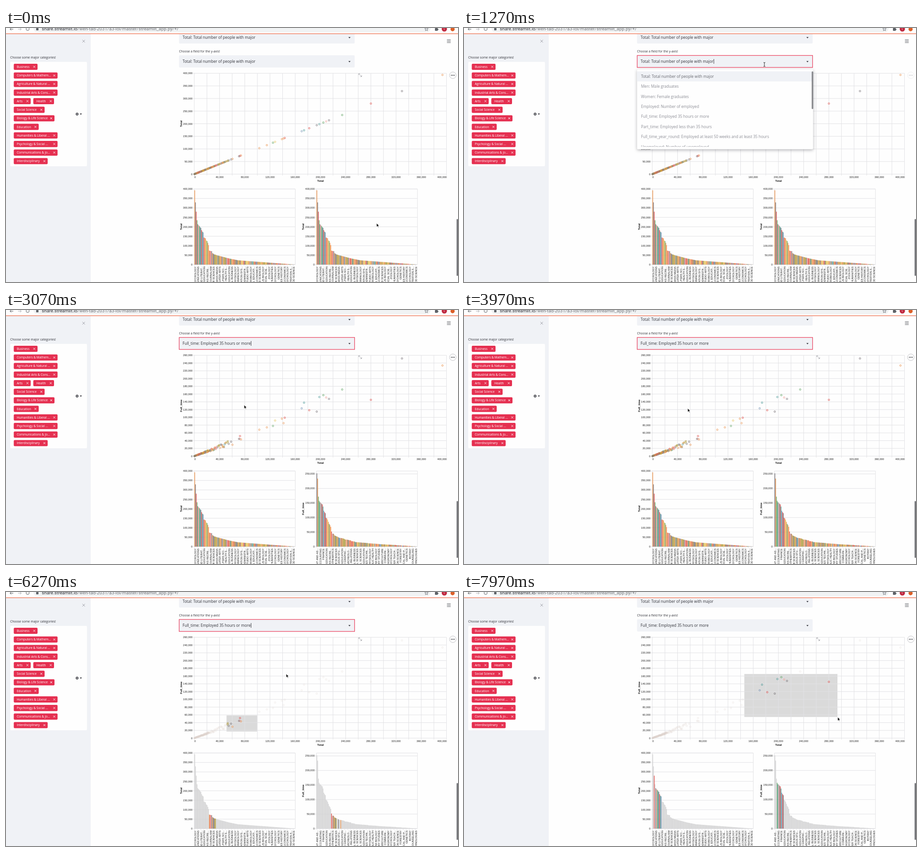
Recreate the animation shown at these times as an HTML page with a canvas. Size 960 by 540 pixels, loop 8000 ms.

```html
<!DOCTYPE html>
<html lang="en">
<head>
<meta charset="utf-8">
<title>Majors explorer</title>
<style>
html, body { margin: 0; width: 100%; height: 100%; overflow: hidden; background: #fefefe; }
canvas { display: block; width: 960px; height: 540px; }
</style>
</head>
<body>
<canvas id="stage" width="960" height="540"></canvas>
<script>
const ctx = document.getElementById('stage').getContext('2d');
const LOOP = 8000;
const UI = '"Open Sans", "Noto Sans", sans-serif';
const AXIS = '"Liberation Sans", Arial, sans-serif';
const PAGE = '#fefefe', TINT = '#f0f2f6', GRID = '#e2e2e5', INK = '#303138', SOFT = '#5f6368';
const RED = '#e52f50', FADED = '#d2d2d3';

// Moments of the interaction
const OPEN = 1200, CLOSE = 2400, UPDATE = 2750, DRAG1 = 4600, DROP1 = 5300, DRAG2 = 6350;

const clamp = (v, a = 0, b = 1) => Math.min(b, Math.max(a, v));
const smooth = u => u * u * (3 - 2 * u);
const mix = (a, b, u) => a + (b - a) * u;

// ---------- data ----------
let seed = 17;
function rand() {
  seed = (seed * 16807) % 2147483647;
  return seed / 2147483647;
}

const PLOT = { x: 400, y: 96.3, w: 535.6, h: 214.4 };
const BASE = PLOT.y + PLOT.h;
const COUNT = 131, BAR_WIDTH = 214.4, PITCH = BAR_WIDTH / COUNT;

const COLORS = {
  O: '#ea9450', R: '#e05450', B: '#7896b8', G: '#62a566', L: '#b09a3c',
  W: '#a0745a', Y: '#79757a', T: '#4d9a98', P: '#f0a09a', E: '#e6c45c'
};
const TOP_COLORS = 'OYRGYPGTYRTBROOEGOO';
const TAIL_COLORS = 'OOORRWWLLBGYYPTE';

// Stage positions of the largest majors in the second scatter plot
const LARGE = [
  [927, 118], [841, 103], [775, 191], [714, 169], [686, 189], [680, 186], [674, 181],
  [665.5, 185], [660, 216], [644, 213], [633, 197], [628, 209], [592, 229], [589.5, 240.5],
  [586, 231], [571.5, 235], [567, 246.5], [554, 249.5], [538, 254.5], [499, 275], [497, 268],
  [496.5, 274], [495, 274], [481, 286.5], [478, 280], [473, 284.5], [471, 279], [470.5, 281.5]
];
const TAIL = [[28, 50e3], [36, 42e3], [44, 33e3], [56, 23e3], [75, 17e3], [100, 9500], [122, 2500], [COUNT - 1, 100]];

function tailTotal(i) {
  const k = TAIL.findIndex(p => p[0] >= i);
  if (k === 0) return TAIL[0][1];
  const [a, b] = [TAIL[k - 1], TAIL[k]];
  return mix(a[1], b[1], (i - a[0]) / (b[0] - a[0]));
}

const majors = Array.from({ length: COUNT }, (_, i) => {
  const total = i < LARGE.length ? (LARGE[i][0] - PLOT.x) / PLOT.w * 4e5 : tailTotal(i);
  const full = i < LARGE.length ? (BASE - LARGE[i][1]) / PLOT.h * 2.6e5 : total * (0.5 + 0.22 * rand());
  const color = COLORS[TOP_COLORS[i] || TAIL_COLORS[Math.floor(rand() * TAIL_COLORS.length)]];
  return { total, full, color };
});
const byFull = [...majors].sort((a, b) => b.full - a.full);

const TOTAL_LABELS = ('PSYCHOLOGY,COMMUNICATIONS,LANGUAGE AND LITERAT...,GENERAL EDUCATION,FITNESS PARKS RECRE...,' +
  'JOURNALISM,COMPUTER SCIENCES,MASS MEDIA,DRAMA AND THEATER ARTS,COMPUTERS SCI...,MEDICAL HEALTH S...,' +
  'ART AND MUSIC EDUCATION,INTERNATIONAL BUSINESS,PHYSIOLOGY,CRIMINOLOGY,INFORMATION SYS...,PUBLIC ADMINISTR...,' +
  'STUDIO ARTS,MICROBIOLOGY,PHYSICAL EDUCATI...,ECONOMICS,APPLIED SCIENCES,VARIOUS BIOLOGY,' +
  'GENERAL SOCIAL SCIE...,ZOOLOGY,HUMANITIES,SOCIAL PSYCHOLOGY,GENETICS,UNITED STATES HISTORY,' +
  'AGRICULTURAL ECONOMICS,COUNSELING PSYCHOLOGY,ADMINISTRATION A...,FOOD SCIENCE').split(',');
const FULL_LABELS = ('MANAGEMENT AND AD...,ACCOUNTING,FINANCE,ELEMENTARY EDUCATION,FITNESS PARKS RECRE...,MATHEMATICS,' +
  'COMPUTER SCIENCES,RELIGIOUS STU...,SPECIAL EDUCATION,ART AND GRAPHIC...,ARCHEOLO...,INTERNATIONAL RELATIONS,' +
  'INTERNATIONAL BUSINESS,GENERAL SOCIAL SCIENCES,POLITICAL SCIENCES,LANGUAGE EDUCATION,SERVICES TECHN...,' +
  'PHYSIOLOGY,PUBLIC HEALTH,MOLECULAR BIOLOGY,INTERDISCIPLINARY STUDIES,AGRICULTURE,OTHER COMMUNI...,AGRONOMY,' +
  'SOCIAL PSYCHOLOGY,COMPUTER TEACH...,NUTRITION SCIENCE,FORESTRY,CLINICAL AND P...,GENETICS,BOTANY,COUNSELING,' +
  'OTHER TECHNOLOGIES').split(',');

// ---------- drawing helpers ----------
function text(s, x, y, size, color = INK, { font = UI, align = 'left', weight = 400, turn = 0 } = {}) {
  ctx.save();
  ctx.translate(x, y);
  ctx.rotate(turn);
  ctx.font = `${weight} ${size}px ${font}`;
  ctx.textAlign = align;
  ctx.textBaseline = 'alphabetic';
  ctx.fillStyle = color;
  ctx.fillText(s, 0, 0);
  ctx.restore();
}
function rect(x, y, w, h, color, r = 0) {
  ctx.fillStyle = color;
  ctx.beginPath();
  ctx.roundRect(x, y, w, h, r);
  ctx.fill();
}
function line(points, color, width = 1) {
  ctx.strokeStyle = color;
  ctx.lineWidth = width;
  ctx.beginPath();
  points.forEach(([x, y], i) => i ? ctx.lineTo(x, y) : ctx.moveTo(x, y));
  ctx.stroke();
}
function disc(x, y, r, color) {
  ctx.fillStyle = color;
  ctx.beginPath();
  ctx.arc(x, y, r, 0, 7);
  ctx.fill();
}
function ring(x, y, r, color, width = 1) {
  ctx.strokeStyle = color;
  ctx.lineWidth = width;
  ctx.beginPath();
  ctx.arc(x, y, r, 0, 7);
  ctx.stroke();
}
function cross(x, y, r, color, width = 1) {
  line([[x - r, y - r], [x + r, y + r]], color, width);
  line([[x - r, y + r], [x + r, y - r]], color, width);
}
function shape(points, color, edge) {
  ctx.beginPath();
  points.forEach(([x, y]) => ctx.lineTo(x, y));
  ctx.closePath();
  ctx.fillStyle = color;
  ctx.fill();
  if (edge) {
    ctx.strokeStyle = edge;
    ctx.lineWidth = 0.8;
    ctx.stroke();
  }
}
const caretDown = (x, y) => shape([[x - 2.3, y - 1.2], [x + 2.3, y - 1.2], [x, y + 1.4]], INK);

// ---------- page ----------
function browserBar() {
  rect(0, 0, 960, 12, PAGE);
  rect(58, -10, 844, 19, '#f1f3f4', 9);
  line([[15.5, 2.5], [8.5, 2.5]], SOFT);
  line([[11.5, -0.5], [8.5, 2.5], [11.5, 5.5]], SOFT);
  line([[25.5, 2.5], [32.5, 2.5]], '#b4b5b9');
  line([[29.5, -0.5], [32.5, 2.5], [29.5, 5.5]], '#b4b5b9');
  ring(46, 2, 3.3, SOFT);
  rect(64, 0, 5, 5, SOFT, 1);
  const font = 'Roboto, sans-serif', size = 9.77, host = 'share.streamlit.io';
  text(host, 76, 5.4, size, INK, { font });
  ctx.font = `${size}px ${font}`;
  text('/wen-tad-2031/a3-lol/master/streamlit_app.py/+/', 76 + ctx.measureText(host).width, 5.4, size, '#75777c', { font });
  const star = Array.from({ length: 10 }, (_, i) => {
    const r = i % 2 ? 1.7 : 4, a = i * Math.PI / 5 - Math.PI / 2;
    return [893 + r * Math.cos(a), 2.5 + r * Math.sin(a)];
  });
  shape(star, TINT, SOFT);
  rect(911, 0, 6, 6, SOFT, 1);
  disc(914, 0, 1.6, SOFT);
  disc(917, 3, 1.6, SOFT);
  disc(931, 2, 5.6, '#c0283f');
  text('L', 931, 4, 5, '#fff', { align: 'center' });
  disc(948.5, 2.5, 4.4, '#dc5f28');
  rect(0, 11.5, 960, 1.5, '#f08468');
}

const TAGS = [
  ['Business', 17, 67, 82.5], ['Computers & Mathem...', 17, 109.5, 101], ['Agriculture & Natural ...', 17, 109.5, 119],
  ['Industrial Arts & Cons...', 17, 109.5, 137.3], ['Arts', 17, 52.5, 155.5], ['Health', 58.5, 102, 155.5],
  ['Social Science', 17, 82, 173.8], ['Biology & Life Science', 17, 103, 192], ['Education', 17, 69.5, 210.2],
  ['Humanities & Liberal ...', 17, 109.5, 228.4], ['Psychology & Social ...', 17, 109.5, 246.6],
  ['Communications & Jo...', 17, 109.5, 264.8], ['Interdisciplinary', 17, 88.5, 283]
];

function sidebar() {
  rect(0, 13, 180, 527, TINT);
  cross(165, 28, 2.8, '#9a9ba3', 0.9);
  text('Choose some major categories!', 9, 64.8, 6.62);
  rect(9, 72, 163, 222, PAGE, 2);
  for (const [name, x, right, y] of TAGS) {
    rect(x - 0.5, y - 6.6, right - x + 0.5, 13.2, RED, 2);
    text(name, x + 6, y + 2.4, 6.5, '#fff');
    cross(right - 7, y, 2, '#fff', 0.9);
  }
  disc(151, 183, 3, '#55565c');
  cross(151, 183, 1.1, PAGE, 0.7);
  caretDown(159, 183);
}

function selectBox(y, value, focused, caret) {
  rect(367.5, y, 373, 26, TINT, 2);
  if (focused) {
    ctx.strokeStyle = '#ea4a66';
    ctx.lineWidth = 1.3;
    ctx.strokeRect(367.8, y + 0.4, 372.6, 25.4);
  }
  text(value, 375, y + 16, 8.17);
  if (caret) {
    ctx.font = `8.17px ${UI}`;
    rect(375.6 + ctx.measureText(value).width, y + 8, 0.9, 10, INK);
  }
  caretDown(729.5, y + 13.5);
}

const OPTIONS = ['Total: Total number of people with major', 'Men: Male graduates', 'Women: Female graduates',
  'Employed: Number of employed', 'Full_time: Employed 35 hours or more', 'Part_time: Employed less than 35 hours',
  'Full_time_year_round: Employed at least 50 weeks and at least 35 hours', 'Unemployed: Number of unemployed'];

function dropdown(t, mouse) {
  const p = smooth(clamp((t - OPEN) / 110));
  const dy = (p - 1) * 3;
  ctx.save();
  ctx.globalAlpha = clamp((t - OPEN) / 50);
  ctx.shadowColor = 'rgba(40,40,50,.35)';
  ctx.shadowBlur = 6;
  ctx.shadowOffsetY = 2;
  rect(367.5, 88.5 + dy, 374, 170, PAGE, 2);
  ctx.shadowColor = 'transparent';
  ctx.beginPath();
  ctx.rect(367, 88 + dy, 375, 165.5);
  ctx.clip();
  const hot = mouse.y < 93 ? 0 : Math.floor((mouse.y - 93) / 21.4);
  OPTIONS.forEach((name, i) => {
    const y = 103.7 + dy + i * 21.4;
    if (i === hot) rect(367.5, y - 10.7, 374, 21.4, TINT);
    text(name, 376, y + 3, 8.17, i === hot ? (i ? INK : '#66676e') : '#8c8d95');
  });
  rect(738.5, 93 + dy, 3.2, 80, '#85868a', 1.5);
  ctx.restore();
}

// ---------- charts ----------
const label = n => n.toLocaleString('en-US');
const axisText = (s, x, y, align = 'right') => text(s, x, y, 5.5, '#1c1c1c', { font: AXIS, align });
const title = (s, x, y, turn = 0) => text(s, x, y, 6, '#111', { font: AXIS, align: 'center', weight: 700, turn });

function yAxis(x, base, width, height, max, step) {
  for (let v = 0; v <= max; v += step) {
    const y = base - v / max * height;
    line([[x - 3, y], [x + width, y]], GRID);
    axisText(label(v), x - 4, y + 2);
  }
}

function scatter(key, picked) {
  const max = key === 'full' ? 2.6e5 : 4e5;
  for (let v = 0; v <= 4e5; v += 2e4) {
    const x = PLOT.x + v / 4e5 * PLOT.w;
    line([[x, PLOT.y], [x, BASE + 3]], GRID);
    if (v % 4e4) continue;
    if (v === 0) axisText('0', PLOT.x, 319, 'left');
    else if (v === 4e5) axisText(label(v), 936, 319);
    else axisText(label(v), x, 319, 'center');
  }
  yAxis(PLOT.x, BASE, PLOT.w, PLOT.h, max, key === 'full' ? 2e4 : 5e4);
  title('Total', 668, 327);
  title(key === 'full' ? 'Full_time' : 'Total', 373.5, 203.5, -Math.PI / 2);
  for (const m of majors) {
    const on = picked(m);
    ctx.globalAlpha = on ? 0.85 : 0.3;
    ring(PLOT.x + m.total / 4e5 * PLOT.w, BASE - m[key] / max * PLOT.h, 1.7, on ? m.color : '#d6c9c4', 1);
  }
  ctx.globalAlpha = 1;
}

function bars(x, key, rows, labels, picked) {
  const max = key === 'full' ? 2.6e5 : 4e5, base = 503, height = 160.7, right = x + BAR_WIDTH;
  yAxis(x, base, BAR_WIDTH, height, max, 5e4);
  line([[x, base - height], [right, base - height], [right, base], [x, base], [x, base - height]], GRID);
  rows.forEach((m, i) => {
    const h = m[key] / max * height;
    rect(x + i * PITCH + 0.1, base - h, PITCH - 0.25, h, picked(m) ? m.color : FADED);
  });
  title(key === 'full' ? 'Full_time' : 'Total', x - 26.5, 422.5, -Math.PI / 2);
  labels.forEach((s, i) => {
    const lx = x + PITCH * (4 * i + 0.5);
    line([[lx, base], [lx, base + 3]], GRID);
    text(s, lx + 3, base + 4, 5.5, '#1c1c1c', { font: AXIS, align: 'right', turn: -Math.PI / 2 });
  });
}

function chartButtons(alpha) {
  ctx.globalAlpha = alpha;
  ring(949, 100.5, 7, '#c4c4c8');
  for (const dx of [-3, 0, 3]) disc(949 + dx, 100.5, 1, INK);
  if (alpha === 1) {
    line([[749.5, 97.5], [755, 103]], '#a6a7ac', 0.9);
    line([[749, 100], [749, 97], [752, 97]], '#a6a7ac', 0.9);
    line([[755.5, 100.5], [755.5, 103.5], [752.5, 103.5]], '#a6a7ac', 0.9);
  }
  ctx.globalAlpha = 1;
}

// ---------- pointer ----------
const PATH = [
  [0, 787, 415], [150, 787, 415], [950, 638, 77], [1350, 638, 77], [2000, 553, 191], [2500, 553, 191],
  [3500, 475, 209], [4050, 475, 209], [4500, 468, 262], [DRAG1, 468, 262], [5150, 534, 297],
  [5550, 534, 297], [6200, 595, 174], [DRAG2, 595, 174], [6860, 731, 253], [7010, 757, 257],
  [7650, 793.5, 266], [LOOP, 793.5, 266]
];
function pointer(t) {
  const k = Math.max(1, PATH.findIndex(p => p[0] >= t));
  const a = PATH[k - 1], b = PATH[k];
  const u = smooth(clamp((t - a[0]) / (b[0] - a[0])));
  return { x: mix(a[1], b[1], u), y: mix(a[2], b[2], u) };
}

function drawPointer({ x, y }, menuOpen) {
  if (y > 58 && y < 85) {
    line([[x - 2, y - 4], [x, y - 3], [x + 2, y - 4]], '#333');
    line([[x, y - 3], [x, y + 4]], '#333');
    line([[x - 2, y + 5], [x, y + 4], [x + 2, y + 5]], '#333');
  } else if (menuOpen && y < 258) {
    shape([[x - 1, y - 1], [x + 0.6, y - 1], [x + 0.8, y + 2.5], [x + 4.4, y + 3.4], [x + 4.2, y + 6.5],
      [x + 3, y + 9], [x - 1, y + 9], [x - 3.6, y + 4.5], [x - 1, y + 5]], '#fff', '#222');
  } else {
    shape([[x, y], [x, y + 8], [x + 1.9, y + 6.3], [x + 3.2, y + 9], [x + 4.5, y + 8.4], [x + 3.3, y + 5.8],
      [x + 5.8, y + 5.6]], '#111', '#fff');
  }
}

// The brush trails the pointer a little
function brushAt(t) {
  if (t < DRAG1 + 120) return null;
  const second = t >= DRAG2;
  const start = pointer(second ? DRAG2 : DRAG1);
  const end = pointer(second ? Math.max(DRAG2, t - 150) : Math.min(t, DROP1) - 110);
  if (end.x - start.x < 0.5) return null;
  return { x: start.x, y: start.y, w: end.x - start.x, h: end.y - start.y };
}

// ---------- frame ----------
function draw(t) {
  const mouse = pointer(t), menuOpen = t >= OPEN && t < CLOSE;
  const key = t >= UPDATE ? 'full' : 'total';
  const brush = brushAt(t);
  const picked = m => {
    if (!brush) return true;
    const dx = PLOT.x + m.total / 4e5 * PLOT.w - brush.x;
    const dy = BASE - m.full / 2.6e5 * PLOT.h - brush.y;
    return dx >= 0 && dx <= brush.w && dy >= 0 && dy <= brush.h;
  };

  rect(0, 0, 960, 540, PAGE);
  sidebar();
  selectBox(7, OPTIONS[0], false, false);
  browserBar();
  text('Choose a field for the y-axis!', 367.5, 51.8, 6.62);
  const caret = t >= OPEN && !(menuOpen && t > 1700) && (t + 10) % 1000 < 500;
  selectBox(58, OPTIONS[t >= CLOSE ? 4 : 0], t >= OPEN && t < DRAG2, caret);
  for (const y of [25, 28, 31]) line([[936.5, y], [944.5, y]], '#55565c');

  if (brush) {
    rect(brush.x, brush.y, brush.w, brush.h, '#dadada');
    ctx.strokeStyle = '#fff';
    ctx.lineWidth = 0.7;
    ctx.strokeRect(brush.x, brush.y, brush.w, brush.h);
  }
  scatter(key, picked);
  bars(400, 'total', majors, TOTAL_LABELS, picked);
  if (key === 'full') bars(659.5, 'full', byFull, FULL_LABELS, picked);
  else bars(659.5, 'total', majors, TOTAL_LABELS, picked);
  chartButtons(mouse.y > 90 && !menuOpen ? 1 : 0.25);
  if (menuOpen) dropdown(t, mouse);
  rect(957, 406, 3, 121, '#77787c', 1.5);
  drawPointer(mouse, menuOpen);
}

const begin = performance.now();
function tick() {
  draw((performance.now() - begin) % LOOP);
  requestAnimationFrame(tick);
}
tick();
</script>
</body>
</html>
```
